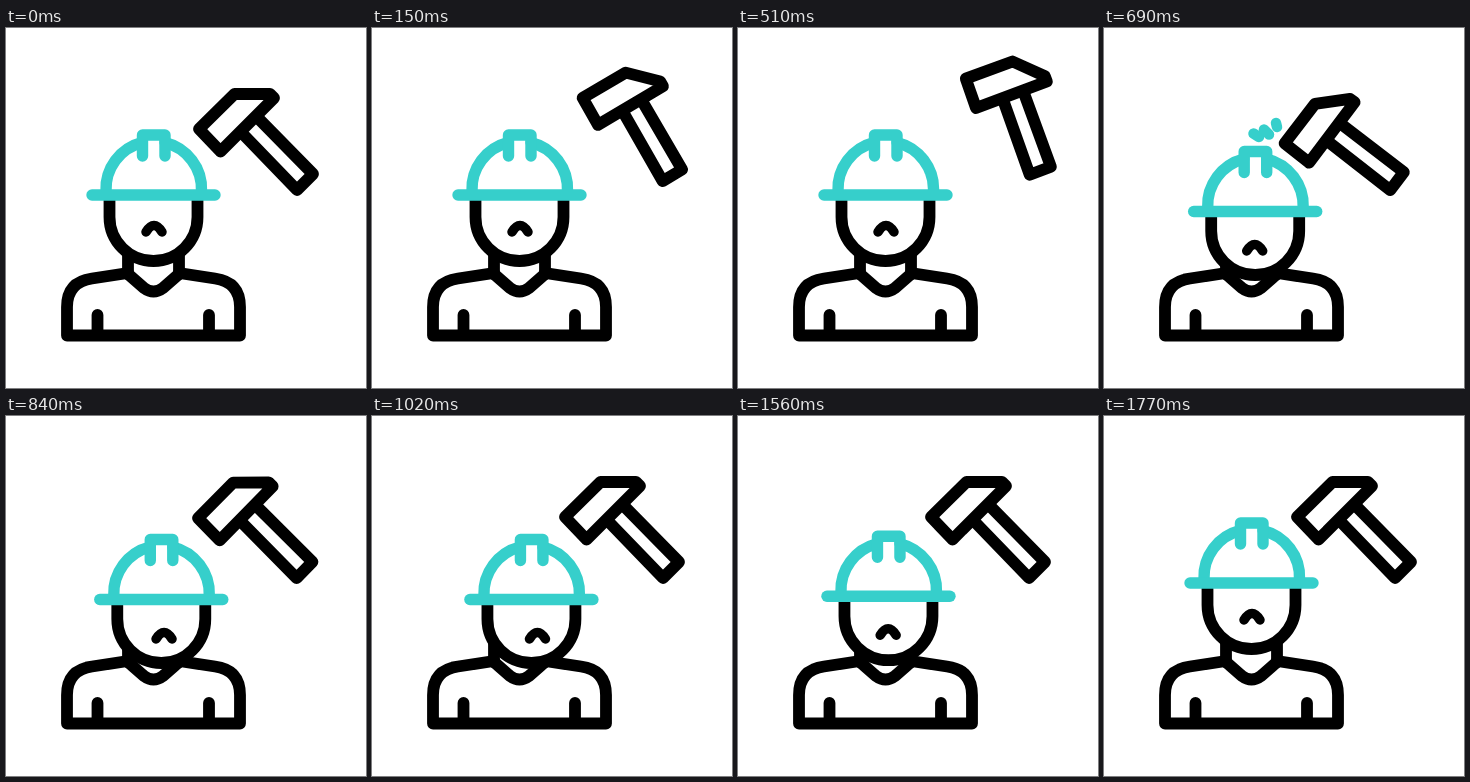
These frames come from a looping animation (360 by 360 pixels, 1.8 s). An HTML page:

```html
<!DOCTYPE html>
<html lang="en">
<head>
<meta charset="utf-8">
<title>Hammer and helmet</title>
<style>
html, body { margin: 0; width: 100%; height: 100%; overflow: hidden; background: #fff; }
svg { display: block; width: 100vw; height: 100vh; }
path { stroke: #000; stroke-width: 11.8; stroke-linecap: round; stroke-linejoin: round; fill: none; }
.solid path { fill: #fff; }
.teal path { stroke: #36cfcb; stroke-width: 11.4; }
#face path { stroke-linecap: butt; }
#mouth path { stroke-width: 9.5; }
</style>
</head>
<body>
<svg viewBox="0 0 360 360">
  <g id="body">
    <path d="M122 218V246M173 218V246"/>
    <path d="M122 245L86 250.5Q61 254 61 279V307.5H234V279Q234 254 209 250.5L173 245"/>
    <path d="M122 246L138 260Q147.5 267 157 260L173 246"/>
    <path d="M91.5 287V307M203 287V307"/>
  </g>
  <g id="face" class="solid"><path d="M103.5 168V189A44 44 0 0 0 191.5 189V168"/></g>
  <g id="mouth"><path d="M-8 3.5Q0 -9.5 8 3.5"/></g>
  <g id="helmet" class="teal">
    <path d="M100 163A48 48 0 0 1 136 114.5M159 114.5A48 48 0 0 1 195.5 163"/>
    <path d="M136.5 128V107H159V128"/>
    <path d="M86 167H209"/>
  </g>
  <g id="sparks" class="teal">
    <path d="M155 109L149.5 105.5"/>
    <path d="M165 106.5L160 101.5"/>
    <path d="M173 99L172 95"/>
  </g>
  <g id="hammer" class="solid">
    <path d="M234 103L291 162L307 146L250 88"/>
    <path d="M193 101L228.5 66H264L268 70L214.5 123.5Z"/>
  </g>
</svg>
<script>
const LOOP = 1800, STEP = 30;
const el = id => document.getElementById(id);
const move = (node, x, y, more = "") =>
  node.setAttribute("transform", `translate(${x} ${y}) ${more}`);

const smooth = u => u * u * (3 - 2 * u);
const strike = u => u ** 1.6;
const part = (t, from, to) => Math.min(1, Math.max(0, (t - from) / (to - from)));
const ramp = (t, from, to, ease = smooth) => ease(part(t, from, to));

const sparks = [...el("sparks").children];

function draw(t) {
  // Swing back, strike, then return to rest
  const back = ramp(t, 690, 870);
  const angle = 33 * ramp(t, 0, 330) - 41 * ramp(t, 420, 660, strike) + 8 * back;
  const reach = ramp(t, 540, 660, strike) - back;
  move(el("hammer"), -6 * reach, -4.7 * reach, `rotate(${angle} 326.5 156)`);

  // The head sinks, shakes once to each side and rises
  const drop = ramp(t, 600, 660) - ramp(t, 1500, 1710);
  const shake = Math.sin(2 * Math.PI * part(t, 780, 1560));
  const x = 3.7 * drop + 8.8 * shake;
  move(el("helmet"), x, 16.5 * drop);
  move(el("face"), x, 14 * drop);
  move(el("mouth"), 148 + x - drop + 7 * shake, 200.5 + 19 * drop);

  // Sparks fan out up and to the left, swelling and fading
  const out = 2 * part(t, 630, 750) - 1;
  el("sparks").style.display = Math.abs(out) < 1 ? "" : "none";
  sparks.forEach((spark, i) => {
    const dir = Math.PI * (1.17 + i * 0.12);
    move(spark, 8 * out * Math.cos(dir), 8 * out * Math.sin(dir));
    spark.style.strokeWidth = 10.5 * (1 - Math.abs(out));
  });
}

const start = performance.now();
function tick() {
  const t = (performance.now() - start) % LOOP;
  draw(Math.floor(t / STEP) * STEP);
  requestAnimationFrame(tick);
}
tick();
</script>
</body>
</html>
```
